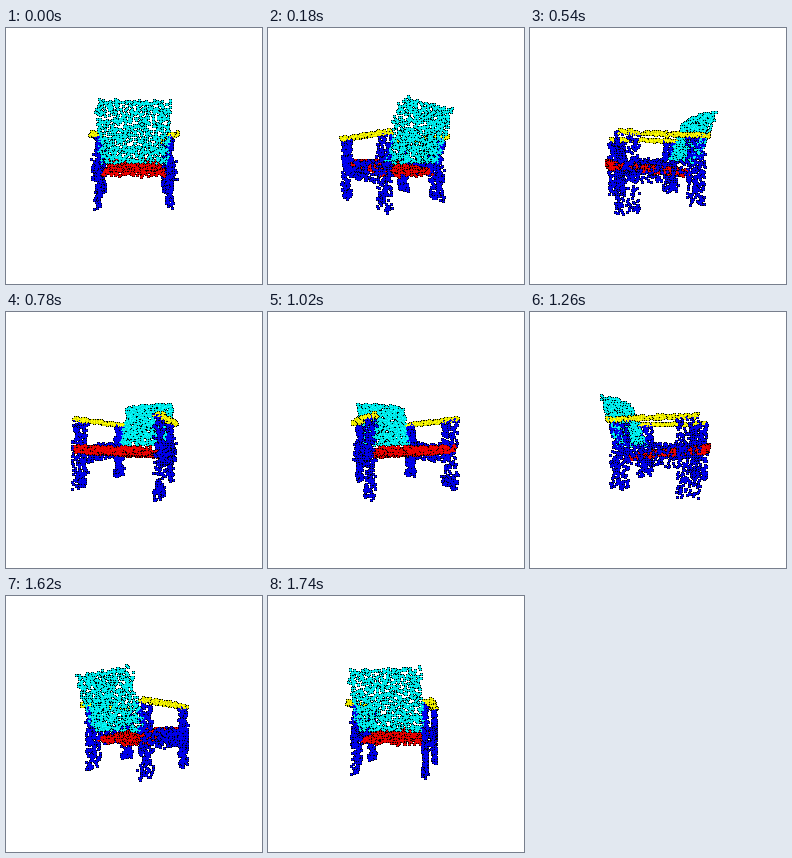
Recreate the animation shown at these times as a matplotlib script. Size 256 px wide and 256 px high, loop 1800 ms.

```python
from itertools import product

import numpy as np
import matplotlib.pyplot as plt
from matplotlib.animation import FuncAnimation

SIZE = 256
FRAMES = 30
FOCAL = 191          # pixels, with the camera one unit from the axis
DOT_DEPTH = 0.03     # how fast a dot recedes towards its rim

CYAN, BLUE, RED, YELLOW = (0, 1, 1), (0, 0, 1), (1, 0, 0), (1, 1, 0)

# Chair dimensions; x: sideways, y: up, z: towards the rear
REAR_X, REAR_Z = 0.16, 0.135
FRONT_X, FRONT_Z = 0.195, -0.19
ARM_Y, FLOOR_Y = 0.095, -0.229
SEAT_Y, SEAT_FRONT = -0.042, -0.245
PLANK, LEG_WIDTH = 0.025, 0.095

rng = np.random.default_rng(7)
points, colors = [], []


def slab(n, color, start, end, size):
    """Scatter n points in a box swept from start to end."""
    start, end = np.array(start), np.array(end)
    along = start + (end - start) * rng.random((n, 1))
    points.append(along + np.array(size) * (rng.random((n, 3)) - 0.5))
    colors.append(np.tile(color, (n, 1)))


def leg(x, z):
    slab(230, BLUE, (x, ARM_Y, z), (x, FLOOR_Y, z), (PLANK, 0, LEG_WIDTH))


# Backrest, seat and the seat's front edge
slab(950, CYAN, (0, 0.222, 0.238), (0, -0.033, 0.138), (0.306, 0, 0.05))
slab(750, RED, (0, SEAT_Y, SEAT_FRONT), (0, SEAT_Y - 0.042, 0.125),
     (0.3, 0.03, 0))
slab(180, RED, (-0.18, SEAT_Y, SEAT_FRONT), (0.18, SEAT_Y, SEAT_FRONT),
     (0, 0.034, 0.015))

for side in (-1, 1):
    rear, front = side * REAR_X, side * FRONT_X
    leg(rear, REAR_Z)
    leg(front, FRONT_Z)
    slab(150, BLUE, (front, -0.065, FRONT_Z), (side * 0.185, -0.065, REAR_Z),
         (PLANK, 0.095, 0))
    slab(210, YELLOW, (front, ARM_Y, -0.23), (side * 0.171, ARM_Y, 0.2),
         (0.042, 0.017, 0))

points = np.vstack(points)
colors = 255 * np.vstack(colors)


def render(angle):
    """Draw every point as a tiny ball, shaded and receding to a black rim."""
    x, y, z = points.T
    c, s = np.cos(angle), np.sin(angle)
    depth = z * c - x * s
    scale = FOCAL / (1 - depth)
    px = np.floor(SIZE / 2 + (x * c + z * s) * scale).astype(int)
    py = np.floor(SIZE / 2 - y * scale).astype(int)

    cols, rows, depths, inks = [], [], [], []
    for dx, dy in product((-1, 0, 1), repeat=2):
        r2 = dx * dx + dy * dy
        cols.append(px + dx)
        rows.append(py + dy)
        depths.append(depth - DOT_DEPTH * r2)
        inks.append(colors * (1, 0.85, 0)[r2])

    order = np.argsort(np.concatenate(depths), kind="stable")
    image = np.full((SIZE, SIZE, 3), 255, np.uint8)
    image[np.concatenate(rows)[order],
          np.concatenate(cols)[order]] = np.vstack(inks)[order].astype(np.uint8)
    return image


fig = plt.figure(figsize=(2.56, 2.56), dpi=100, facecolor="white")
ax = fig.add_axes([0, 0, 1, 1])
ax.axis("off")
view = ax.imshow(render(0), interpolation="nearest", aspect="auto")


def update(i):
    view.set_data(render(2 * np.pi * i / FRAMES))
    return [view]


anim = FuncAnimation(fig, update, frames=FRAMES, interval=60,
                     repeat=True, repeat_delay=0)
plt.show()
```
